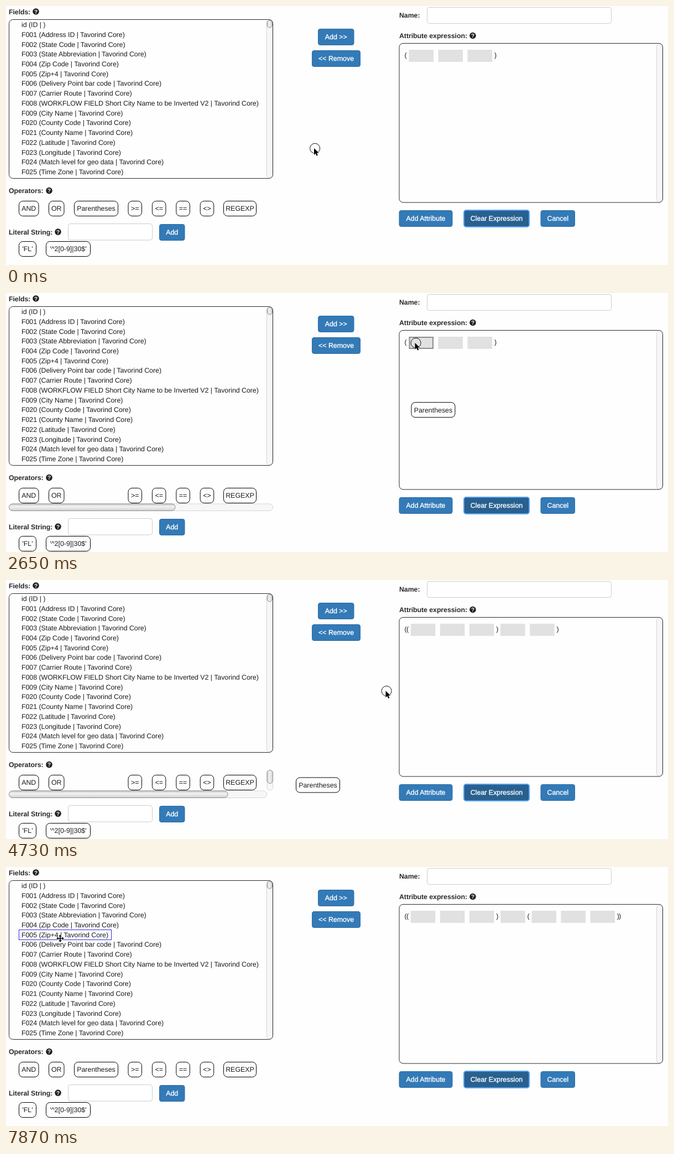
An HTML page that plays this animation: 1197x468 px, repeating every 8 s.

```html
<!DOCTYPE html>
<html lang="en">
<head>
<meta charset="utf-8">
<title>Attribute expression builder</title>
<style>
  html, body { margin: 0; width: 100%; height: 100%; overflow: hidden; background: #fefefe; }
  svg { display: block; }
  text {
    font: 12.4px "Liberation Sans", Arial, sans-serif;
    fill: #1c1c1c; text-rendering: geometricPrecision; white-space: pre;
  }
  .label { font-weight: bold; letter-spacing: -.08px; fill: #2a2a2a; }
  .row { letter-spacing: -.045px; }
  .mid { text-anchor: middle; }
  .btn rect { fill: #337ab7; stroke: #2e6da4; }
  .btn text { fill: #fff; stroke: #fff; stroke-width: .35; }
  .focus rect { fill: #286090; stroke: #204d74; }
  .focus .ring { fill: none; stroke: #5aa2f0; stroke-width: 2; }
  .chip rect { fill: #fefefe; stroke: #000; }
  .panel { fill: none; stroke: #2a2a2a; }
  .input { fill: #fff; stroke: #ccc; }
  .track { fill: #f7f7f7; stroke: #d6d6d6; }
  .thumb { fill: url(#metal); stroke: #8e8e8e; }
  .thumb.side { fill: url(#metalSide); }
  .slot { fill: #e1e1e1; }
  .over { fill: none; stroke: #8c8c8c; stroke-width: 2; }
</style>
</head>
<body>
<svg id="stage" width="1197" height="468" viewBox="0 0 1197 468">
  <defs>
    <linearGradient id="metal" x2="0" y2="1">
      <stop stop-color="#c9c9c9"/><stop offset=".4" stop-color="#f3f3f3"/><stop offset="1" stop-color="#cfcfcf"/>
    </linearGradient>
    <linearGradient id="metalSide">
      <stop stop-color="#c9c9c9"/><stop offset=".4" stop-color="#f3f3f3"/><stop offset="1" stop-color="#cfcfcf"/>
    </linearGradient>
  </defs>
</svg>
<script>
const stage = document.getElementById('stage');

function add(parent, tag, attrs = {}, content) {
  const node = document.createElementNS('http://www.w3.org/2000/svg', tag);
  for (const key in attrs) node.setAttribute(key, attrs[key]);
  if (content !== undefined) node.textContent = content;
  return parent.appendChild(node);
}
const group = (parent, cls = '') => add(parent, 'g', { class: cls });
const rect = (parent, x, y, width, height, rx, cls) =>
  add(parent, 'rect', { x, y, width, height, rx, class: cls });
const text = (parent, x, y, content, cls) => add(parent, 'text', { x, y, class: cls }, content);
const show = (node, on) => node.setAttribute('display', on ? 'inline' : 'none');
const move = (node, x, y) => node.setAttribute('transform', `translate(${x} ${y})`);

function label(parent, x, y, content, iconX) {
  text(parent, x, y, content, 'label');
  if (!iconX) return;
  add(parent, 'circle', { cx: iconX, cy: y - 4.7, r: 5.8, fill: '#222' });
  add(parent, 'text', {
    x: iconX, y: y - 1, class: 'mid', style: 'font-size:10px;font-weight:bold;fill:#fff'
  }, '?');
}

function button(parent, x, y, width, content, focus) {
  const g = group(parent, focus ? 'btn focus' : 'btn');
  rect(g, x + .5, y + .5, width - 1, 29, 3.5);
  if (focus) rect(g, x, y, width, 30, 4, 'ring');
  text(g, x + width / 2, y + 19.2, content, 'mid');
}

function chip(parent, x, y, width, content) {
  const g = group(parent, 'chip');
  rect(g, x + .5, y + .5, width - 1, 27, 7);
  text(g, x + width / 2, y + 18.4, content, 'mid');
  return g;
}

// Left column
label(stage, 5, 14.7, 'Fields:', 54);
rect(stage, 471.5, 25.5, 10.5, 285.5, 5, 'track');
rect(stage, 472, 26, 9.5, 13, 4.7, 'thumb side');
rect(stage, 5.5, 24.5, 477, 287, 7, 'panel');
const fields = [
  'F001 (Address ID', 'F002 (State Code', 'F003 (State Abbreviation', 'F004 (Zip Code',
  'F005 (Zip+4', 'F006 (Delivery Point bar code', 'F007 (Carrier Route',
  'F008 (WORKFLOW FIELD Short City Name to be Inverted V2', 'F009 (City Name',
  'F020 (County Code', 'F021 (County Name', 'F022 (Latitude', 'F023 (Longitude',
  'F024 (Match level for geo data', 'F025 (Time Zone'
].map(name => name + ' | Tavorind Core)');
['id (ID | )', ...fields].forEach((name, i) => text(stage, 28, 38.1 + i * 17.73, name, 'row'));
const picked = add(stage, 'rect', {
  x: 23.5, y: 113.5, width: 167, height: 18, fill: 'none', stroke: '#2b2bea'
});

label(stage, 5, 338.3, 'Operators:', 78);
chip(stage, 23, 352, 36.5, 'AND');
chip(stage, 77, 352, 28.5, 'OR');
const home = chip(stage, 123, 352, 80, 'Parentheses');
['>=', '<=', '==', '<>'].forEach((sign, i) => chip(stage, 220.5 + i * 43.4, 352, 25.5, sign));
chip(stage, 393, 352, 60, 'REGEXP');

const bars = group(stage);
const track = rect(bars, 5.5, 381, 477, 12.5, 6.2, 'track');
const thumb = rect(bars, 5.5, 381, 477, 12.5, 6.2, 'thumb');
const sideBar = group(bars);
rect(sideBar, 472, 343.5, 10.5, 36.5, 5.2, 'track');
rect(sideBar, 472, 343.5, 10.5, 24, 5.2, 'thumb side');

const lower = group(stage);
label(lower, 5, 412.8, 'Literal String:', 94);
rect(lower, 112.5, 393.5, 152, 29.5, 4, 'input');
button(lower, 277, 394, 46.5, 'Add');
chip(lower, 23, 425, 32, "'FL'");
chip(lower, 72, 425, 81, "'^2[0-9]|30$'");

// Middle and right columns
button(stage, 564, 41, 65.5, 'Add >>');
button(stage, 553, 80, 88, '<< Remove');
label(stage, 711, 21.3, 'Name:');
rect(stage, 761.5, 2.5, 333, 29, 4, 'input');
label(stage, 711, 58.2, 'Attribute expression:', 844);
rect(stage, 1176.5, 68.5, 10.5, 286, 5, 'track');
rect(stage, 711, 67.5, 476.5, 287.5, 7, 'panel');
button(stage, 710.5, 369, 97, 'Add Attribute');
button(stage, 828, 369, 118, 'Clear Expression', true);
button(stage, 966.5, 369, 62.5, 'Cancel');

// Each "_" is an empty slot
const SLOT = 44.5;
function expression(pattern) {
  const node = group(stage);
  const slots = [];
  let x = 721;
  for (const c of pattern) {
    if (c === '_') {
      slots.push(x + 4.25);
      rect(node, x + 4.25, 79, SLOT, 22, 0, 'slot');
      x += SLOT + 8.5;
    } else {
      text(node, x - .4, 93.2, c);
      x += 3.3;
    }
  }
  return { node, slots };
}
const expressions = ['(___)', '((___)__)', '((___)_(___))'].map(expression);
const hover = rect(stage, 1, 80, SLOT - 2, 20, 0, 'over');

// Dragged chip and pointer
const dragged = chip(stage, 0, 0, 80, 'Parentheses');
const pointer = group(stage);
const ring = add(pointer, 'circle', { cx: 1.6, cy: .3, r: 9, fill: 'none', stroke: '#111' });
const arrow = add(pointer, 'path', {
  fill: '#000', stroke: '#fff', 'paint-order': 'stroke',
  d: 'M0 0V12L2.8 9.4L4.7 13.7L6.8 12.8L4.9 8.6H8.6Z'
});
const cross = group(pointer);
const arm = 'M-.8 .8V-3.6H-2.8L0 -6.8L2.8 -3.6H.8V.8Z';
for (const color of ['#fff', '#000']) {
  for (let turn = 0; turn < 360; turn += 90) {
    add(cross, 'path', {
      d: arm, fill: color, stroke: color, 'stroke-width': color === '#fff' ? 1.6 : 0,
      transform: `rotate(${turn})`
    });
  }
}

const LOOP = 8000, STEP = 148, LEAD = 20;
const start = { x: 557, y: 257 };
const moves = [
  { from: 0, to: 6, x: 176, y: 373, power: 1.5 },
  { from: 7, to: 12, x: 651, y: 144, power: 2.5 },
  { from: 13, to: 18, x: 739.5, y: 90, power: 1.1 },
  { from: 22, to: 28, x: 175, y: 375, power: 1.5 },
  { from: 29, to: 33, x: 857, y: 142, power: 1 },
  { from: 34, to: 40, x: 956, y: 93, power: 3 },
  { from: 41, to: 49, x: 98, y: 129, power: 1.5 }
];
const drags = [{ from: 7, drop: 20, ringEnd: 20 }, { from: 29, drop: 41, ringEnd: 39 }];
const pickStep = 52;

function pointerAt(step) {
  let { x, y } = start;
  for (const m of moves) {
    const k = Math.min(1, Math.max(0, (step - m.from) / (m.to - m.from)));
    const eased = 1 - (1 - k) ** m.power;
    x += (m.x - x) * eased;
    y += (m.y - y) * eased;
  }
  return { x, y };
}

// The chip trails the pointer by one step and makes the operator row overflow
function drawDrag(step) {
  const lead = pointerAt(step - 1);
  const left = lead.x + 8, top = Math.min(lead.y + 98, 403);
  const side = top > 352;
  const room = side ? 466 : 477;
  const content = left + 80 - 55;
  const overflow = side || content > room;
  move(dragged, left, top);
  track.setAttribute('width', room);
  thumb.setAttribute('width', Math.min(room, room * room / content));
  show(sideBar, side);
  return overflow;
}

function draw(step) {
  const { x, y } = pointerAt(step);
  const drag = drags.find(d => step > d.from && step < d.drop);
  const overflow = drag ? drawDrag(step) : false;
  show(home, !drag);
  show(dragged, drag);
  show(bars, overflow);
  if (!overflow) show(sideBar, false);
  move(lower, 0, overflow ? 14 : 0);

  const done = drags.filter(d => step >= d.drop).length;
  expressions.forEach((e, i) => show(e.node, i === done));
  const target = expressions[done].slots.find(left => x > left && x < left + SLOT);
  const over = drag && target !== undefined && y > 79 && y < 101;
  show(hover, over);
  if (over) move(hover, target, 0);
  show(picked, step >= pickStep);

  const grab = !drag && x < 205;
  move(pointer, x, y);
  show(cross, grab);
  show(arrow, !grab);
  show(ring, step < 2 || (drag && step < drag.ringEnd));
}

function loop(now) {
  draw(Math.floor((now % LOOP + LEAD) / STEP));
  requestAnimationFrame(loop);
}
draw(0);
requestAnimationFrame(loop);
</script>
</body>
</html>
```
